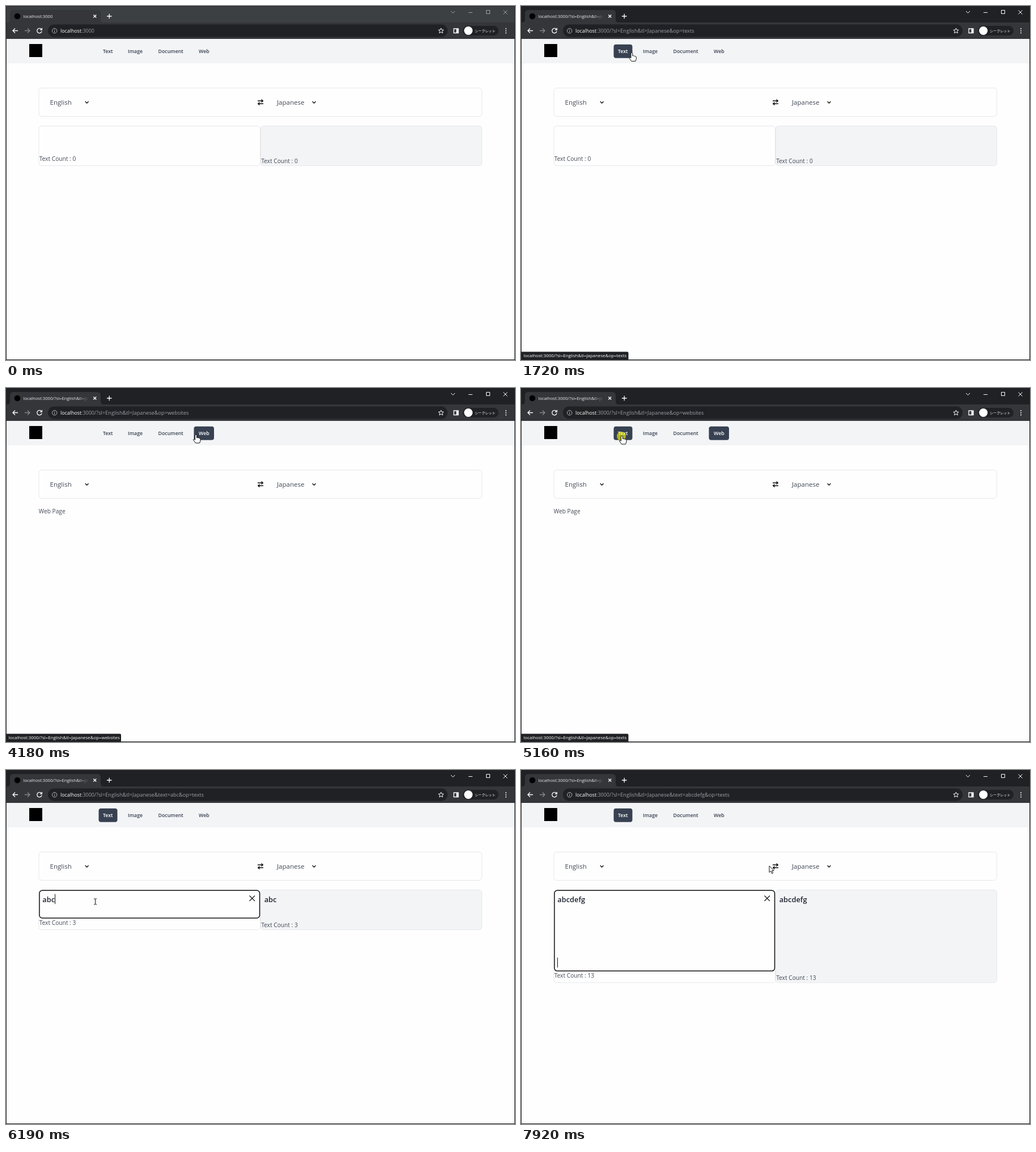
An HTML page that plays this animation: 898 px wide and 624 px high, repeating every 8 s.

```html
<!DOCTYPE html>
<html lang="en">
<head>
<meta charset="utf-8">
<title>Translate demo</title>
<style>
  html, body { margin: 0; width: 100%; height: 100%; overflow: hidden; background: #fff; }
  svg { display: block; width: 898px; height: 624px; }
  text { font-family: "Open Sans", "Noto Sans", sans-serif; white-space: pre; }
  .icon { fill: none; stroke: #fff; stroke-width: 1.3; }
  .body { font-size: 10.2px; fill: #414854; }
  .lang { font-size: 11.55px; fill: #414854; }
  .nav { font-size: 8.8px; font-weight: 600; }
  .entry { font-size: 12.8px; font-weight: 600; fill: #1f2430; }
  .panel { stroke: #e5e7eb; }
  .dark { fill: none; stroke: #111; stroke-width: 1.4; }
  .pointer { fill: #fff; stroke: #111; stroke-width: 1; stroke-linejoin: round; }
</style>
</head>
<body>
<svg viewBox="0 0 898 624">
  <defs>
    <linearGradient id="fade" gradientUnits="userSpaceOnUse" x1="128" x2="146" y1="0" y2="0">
      <stop stop-color="#e8eaed"/><stop offset="1" stop-color="#e8eaed" stop-opacity="0"/>
    </linearGradient>
    <clipPath id="tabClip"><rect x="28" y="8" width="116" height="20"/></clipPath>
  </defs>

  <!-- browser frame -->
  <rect width="898" height="624" fill="#202124"/>
  <rect id="titleBar" x="1" y="1" width="896" height="29"/>
  <path d="M2 29Q7 29 7 24V13Q7 7 13 7H161Q167 7 167 13V24Q167 29 172 29H897V58H1V29Z" fill="#35363a"/>
  <circle cx="20" cy="18" r="5.3" fill="#000"/>
  <text id="tabTitle" x="30.500" y="21.200" font-size="7.7" fill="url(#fade)" clip-path="url(#tabClip)"></text>
  <path class="icon" d="M154.300 15.500l5 5m0-5l-5 5M178 18h8.500m-4.250-4.250v8.500"/>
  <path id="windowIcons" class="icon" style="stroke-width:1" d="M785 9l3.500 3.500L792 9M816 11.500h7M847.500 7.500h6v6h-6zM877.500 7.500l7 7m0-7l-7 7"/>
  <path class="icon" d="M21 43.500h-9m4-4l-4 4 4 4"/>
  <path class="icon" style="stroke:#85878b" d="M33 43.500h9m-4-4l4 4-4 4"/>
  <path class="icon" d="M62.500 41.200a4.200 4.200 0 1 0 .6 3.300M63.400 38.700v3.400h-3.400"/>
  <rect x="74" y="32.500" width="705" height="22" rx="11" fill="#202124"/>
  <g class="icon" style="stroke:#b6b9be;stroke-width:1">
    <circle cx="85.700" cy="43.700" r="4.200"/><path d="M85.700 43v3m0-5v1"/>
  </g>
  <text y="47" x="96" font-size="8.9" fill="#9aa0a6"><tspan fill="#fff">localhost</tspan>:3000<tspan id="path" font-size="9.2"></tspan></text>
  <path class="icon" style="stroke-width:1" d="M767.500 39l1.300 3 3.300.3-2.500 2.200.8 3.200-2.900-1.700-2.900 1.700.8-3.200-2.500-2.200 3.300-.3z"/>
  <path class="icon" d="M790 40h8v7.500h-8z"/><path d="M794.500 40h3.500v7.500h-3.500z" fill="#fff"/>
  <rect x="806" y="35" width="63" height="17" rx="8.5" fill="#202124"/>
  <circle cx="815.700" cy="43.500" r="7.500" fill="#fff"/>
  <text x="827" y="46.200" font-size="6.1" fill="#fff" style="font-family:'Noto Sans CJK JP','Noto Sans CJK',sans-serif">シークレット</text>
  <g fill="#fff"><circle cx="882" cy="40" r="1"/><circle cx="882" cy="43.700" r="1"/><circle cx="882" cy="47.400" r="1"/></g>

  <!-- page -->
  <rect x="1" y="58" width="896" height="565" fill="#fefefe"/>
  <rect x="1" y="58" width="896" height="43" fill="#f3f4f6"/>
  <rect x="41" y="67" width="23" height="23" fill="#000"/>
  <g id="nav"></g>
  <rect class="panel" x="58" y="144.500" width="781.500" height="50" rx="5" fill="#fefefe"/>
  <text class="lang" x="77.500" y="174.200">English</text>
  <text class="lang" x="478" y="174.200">Japanese</text>
  <path class="dark" d="M139.800 168.300l2.900 2.900 2.900-2.900M540.600 168.300l2.900 2.900 2.900-2.900"/>
  <path class="dark" d="M444 167.300h9m-2.500-2.500l2.800 2.500-2.800 2.500M454 172.300h-9m2.500-2.500l-2.800 2.500 2.800 2.500"/>
  <text id="pageName" class="body" x="57.700" y="220.800"></text>

  <g id="translator">
    <rect id="leftPanel" class="panel" x="58" y="211.500" width="390.500" rx="5" fill="#fefefe"/>
    <rect id="rightPanel" class="panel" x="449.500" y="211.500" width="390" rx="5" fill="#f3f4f6"/>
    <rect id="focusRing" x="59" y="212.300" width="388.500" rx="5" fill="none" stroke="#111" stroke-width="1.5"/>
    <text id="input" class="entry" x="64.300" y="232.600"></text>
    <text id="output" class="entry" x="455.700" y="232.600"></text>
    <path id="clear" class="dark" style="stroke-width:1.1" d="M429.500 221.500l9.500 9.500m0-9.500l-9.500 9.500"/>
    <rect id="caret" width="1" height="17.500" fill="#111"/>
    <text id="leftCount" class="body" x="58.700"></text>
    <text id="rightCount" class="body" x="450.200"></text>
  </g>

  <g id="status">
    <path id="bubble" fill="#202124"/>
    <text id="link" x="4.500" y="619.300" font-size="7.9" fill="#fff"></text>
  </g>

  <circle id="click" r="8" fill="#ff0" opacity=".6"/>
  <g id="pointer">
    <path id="hand" class="pointer" d="M-1.500 1Q0-1 1.500 1V5.500Q3 4.700 4 6Q5.500 5.300 6.300 6.700Q8 6.300 8 8V11L6.500 15H-.5L-4.300 9.800Q-5 8-3.300 8L-1.500 9.500Z"/>
    <path id="arrow" class="pointer" d="M0 0V11.500L2.700 9 4.700 13.500 6.700 12.600 4.700 8.300H8.300Z"/>
    <path id="beam" class="dark" style="stroke-width:1" d="M-2.500-5H-.5L0-4.500.5-5H2.500M0-4.500V4.500M-2.500 5H-.5L0 4.500.5 5H2.500"/>
  </g>
</svg>
<script>
const LOOP = 8000, LINE = 56 / 3, LAST_FOCUS = 5800;
const $ = id => document.getElementById(id);
const set = (id, attrs) => { for (const k in attrs) $(id).setAttribute(k, attrs[k]); };
const write = (id, s) => { if ($(id).textContent !== s) $(id).textContent = s; };
const show = (id, on) => { $(id).style.display = on ? '' : 'none'; };
const clamp = v => Math.max(0, Math.min(1, v));

const links = [
  { label: 'Text', op: 'texts', x: 163.5, w: 33, tx: 171 },
  { label: 'Image', op: 'images', x: 207, w: 43, tx: 215 },
  { label: 'Document', op: 'docs', x: 260.500, w: 60.500, tx: 268.500 },
  { label: 'Web', op: 'websites', x: 331.500, w: 35.500, tx: 340 }
];
$('nav').innerHTML = links.map(l =>
  `<rect x="${l.x}" y="67.700" width="${l.w}" height="24" rx="4" fill="#374151"/>
   <text class="nav" x="${l.tx}" y="83">${l.label}</text>`).join('');
links.forEach((l, i) => { [l.box, l.text] = [...$('nav').children].slice(2 * i, 2 * i + 2); });

// start, end, target x, target y
const moves = [
  [430, 1200, 180, 82], [1600, 1920, 228, 83], [2400, 2760, 297, 77],
  [3350, 3730, 335, 82], [4380, 4760, 181, 87], [4860, 5000, 178, 84],
  [5340, 5780, 157.500, 232], [6830, 7600, 376, 177], [7700, 7920, 438, 169]
];
const visits = [[1400, 0], [2260, 1], [3050, 2], [4100, 3], [5290, 0]];
const clicks = [1330, 2160, 2930, 4010, 5160, LAST_FOCUS];
const keys = [6000, 6080, 6160, 6260, 6320, 6380, 6440, 6500, 6560, 6620, 6680, 6740, 6810];

function pointerAt(t) {
  let x = 674, y = 520;
  for (const [start, end, tx, ty] of moves) {
    const p = clamp((t - start) / (end - start)), e = p * p * (3 - 2 * p);
    x += (tx - x) * e;
    y += (ty - y) * e;
  }
  return { x, y };
}

function hoveredAt(t) {
  if (t < 430) return -1;
  const { x, y } = pointerAt(t);
  return links.findIndex(l => x >= l.x && x <= l.x + l.w && y >= 67 && y <= 92);
}

// the status bubble keeps the latest link the pointer touched
function lastHovered(t) {
  for (let s = t; s > 1000; s -= 20) {
    const i = hoveredAt(s);
    if (i >= 0) return i;
  }
  return 0;
}

function draw(t) {
  const visit = visits.filter(v => t >= v[0]).pop();
  const active = visit ? visit[1] : -1;
  const hover = hoveredAt(t);
  const typed = keys.filter(k => t >= k).length;
  const text = 'abcdefg'.slice(0, typed);
  const breaks = Math.max(0, typed - 7);
  const grow = Math.max(0, breaks - 1) * LINE;
  const query = op => '/?sl=English&tl=Japanese' + (text && '&text=' + text) + '&op=' + op;
  const path = visit ? query(links[active].op) : '';

  const awake = t >= 1330;
  set('titleBar', { fill: awake ? '#202124' : '#3c4043' });
  set('windowIcons', { opacity: awake ? 1 : .5 });
  write('tabTitle', 'localhost:3000' + path);
  write('path', path);

  links.forEach((l, i) => {
    const lit = i === active || i === hover;
    l.box.style.display = lit ? '' : 'none';
    l.text.setAttribute('fill', lit ? '#fff' : '#374151');
  });

  const translating = active <= 0, focused = t >= LAST_FOCUS;
  show('translator', translating);
  write('pageName', translating ? '' : links[active].label + ' Page');
  set('leftPanel', { height: 70 + grow });
  set('rightPanel', { height: 70 + grow });
  set('focusRing', { height: 48.700 + grow });
  show('focusRing', focused);
  show('caret', focused);
  show('clear', typed > 0);
  write('input', text);
  write('output', text);
  for (const [id, y] of [['leftCount', 272.700], ['rightCount', 276.700]]) {
    write(id, 'Text Count : ' + typed);
    set(id, { y: y + grow });
  }
  const caretX = breaks || !text || !translating ? 64 : 64.300 + $('input').getComputedTextLength();
  set('caret', { x: caretX, y: 218.700 + breaks * LINE });

  const target = links[lastHovered(t)];
  const width = { images: 198, websites: 203 }[target.op] || 189.500;
  write('link', 'localhost:3000/?sl=English&tl=Japanese&op=' + target.op);
  set('bubble', { d: `M0 609.500H${width - 2}q2 0 2 2V624H0Z` });
  set('status', { opacity: clamp((t - 1195) / 40) * clamp((5650 - t) / 50) });

  const { x, y } = pointerAt(t);
  const inField = translating && x > 59 && x < 448 && y > 212 && y < 261 + grow;
  show('pointer', t >= 430);
  set('pointer', { transform: `translate(${x} ${y})` });
  show('hand', hover >= 0);
  show('beam', hover < 0 && inField);
  show('arrow', hover < 0 && !inField);
  show('click', clicks.some(c => t >= c && t < c + 140));
  set('click', { cx: x - 1, cy: y + 1 });
}

const began = performance.now();
function tick() {
  draw((performance.now() - began) % LOOP);
  requestAnimationFrame(tick);
}
tick();
</script>
</body>
</html>
```
